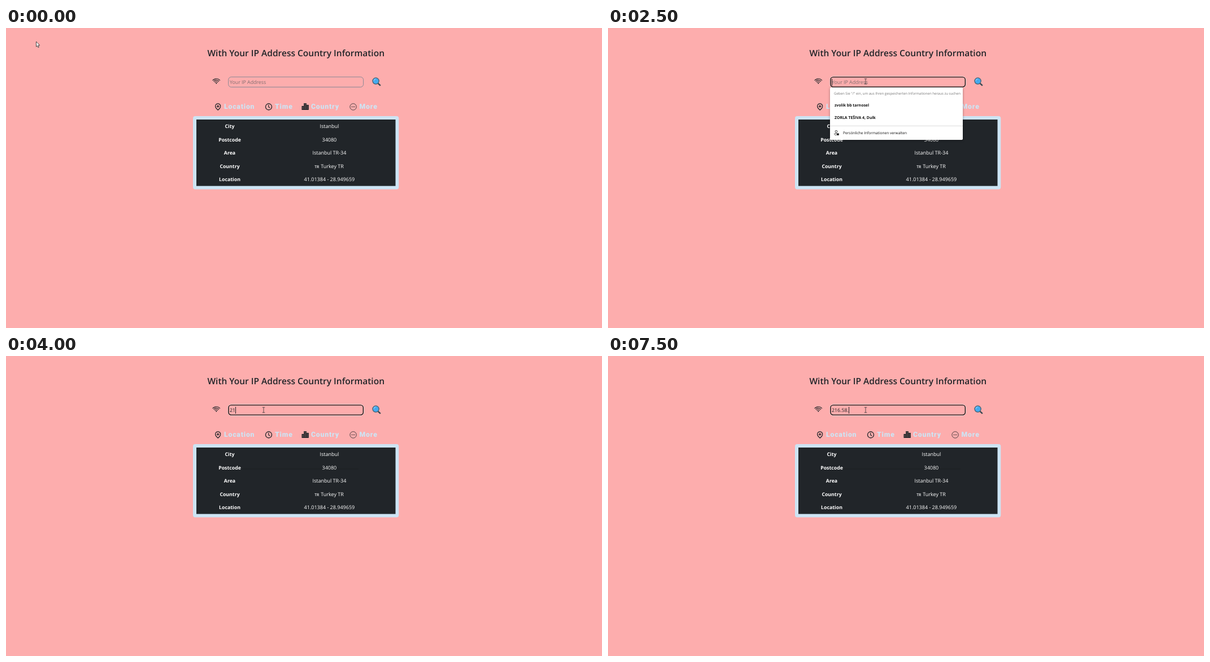
An HTML page with a canvas for the animation above (8000 ms loop, 1055 by 531 pixels).

```html
<!DOCTYPE html>
<html lang="en">
<head>
<meta charset="utf-8">
<title>IP address lookup</title>
<style>
  html, body { margin: 0; width: 100%; height: 100%; overflow: hidden; background: #fdadad; }
  canvas { display: block; }
</style>
</head>
<body>
<canvas id="stage" width="1055" height="531"></canvas>
<script>
const ctx = document.getElementById('stage').getContext('2d');
const LOOP = 8000, STEP = 500;
const PINK = '#fdadad', DARK = '#212529', PALE = '#cde4f4';
const SANS = '"Open Sans", "Noto Sans", sans-serif';

const ROWS = [
  ['City', 'Istanbul'],
  ['Postcode', '34080'],
  ['Area', 'Istanbul TR-34'],
  ['Country', 'Turkey TR'],
  ['Location', '41.01384 - 28.949659']
];

// Each entry holds from its step until the next one.
const POINTER = [
  [0, 'arrow', 53, 23.5], [1, 'arrow', 519, 122.5], [2, 'beam', 567, 199],
  [3, 'beam', 426, 98], [4, 'hand', 481, 133], [5, 'beam', 456, 94.5], [6, 'beam', 456, 95.5]
];
const TYPED = [[0, ''], [7, '2'], [8, '21'], [9, '216'], [11, '216.'], [13, '216.5'], [14, '216.58'], [15, '216.58.']];
const CARET_OFF = [6, 12];

const at = (track, step) => track.filter(entry => entry[0] <= step).pop();

function text(str, x, y, size, { weight = 400, color = DARK, align = 'left', family = SANS, spacing = 0 } = {}) {
  ctx.font = `${weight} ${size}px ${family}`;
  ctx.letterSpacing = spacing + 'px';
  ctx.textAlign = align;
  ctx.fillStyle = color;
  ctx.fillText(str, x, y);
}

function rect(x, y, w, h, color) {
  ctx.fillStyle = color;
  ctx.fillRect(x, y, w, h);
}

function roundRect(x, y, w, h, r) {
  ctx.beginPath();
  ctx.roundRect(x, y, w, h, r);
}

function stroke(color, width) {
  ctx.strokeStyle = color;
  ctx.lineWidth = width;
  ctx.stroke();
}

function fill(color) {
  ctx.fillStyle = color;
  ctx.fill();
}

function circle(x, y, r) {
  ctx.beginPath();
  ctx.arc(x, y, r, 0, Math.PI * 2);
}

function line(color, width, ...points) {
  ctx.beginPath();
  points.forEach(([x, y]) => ctx.lineTo(x, y));
  stroke(color, width);
}

function wifi() {
  ctx.lineCap = 'round';
  [3.4, 6, 8.6].forEach(r => {
    ctx.beginPath();
    ctx.arc(372.3, 98.4, r, -Math.PI * 0.76, -Math.PI * 0.24);
    stroke(DARK, 1.15);
  });
  ctx.lineCap = 'butt';
  circle(372.3, 97.8, 1.1);
  fill(DARK);
}

function magnifier() {
  ctx.lineCap = 'round';
  line('#37474f', 2.4, [659, 98.4], [662.2, 101.3]);
  ctx.lineCap = 'butt';
  circle(654.6, 93.8, 5.6);
  fill('#45a9ee');
  stroke('#4a5f6d', 1.3);
  ctx.beginPath();
  ctx.arc(654.6, 93.8, 3.6, Math.PI, Math.PI * 1.5);
  stroke('#9bd4f8', 1);
}

function pin() {
  ctx.beginPath();
  ctx.arc(375.2, 138.4, 4.5, Math.PI * 0.85, Math.PI * 0.15);
  ctx.quadraticCurveTo(378.4, 142.8, 375.2, 145.2);
  ctx.quadraticCurveTo(372, 142.8, 371.2, 140.4);
  ctx.closePath();
  stroke(DARK, 1.35);
  line(DARK, 1.3, [372.8, 138.6], [377.6, 138.6]);
  line(DARK, 1.3, [375.2, 136.2], [375.2, 141]);
}

function clock() {
  circle(465, 139.5, 5.5);
  stroke(DARK, 1.3);
  line(DARK, 1.2, [464.8, 136], [464.8, 139.8], [467.2, 141.4]);
}

function buildings() {
  rect(523.5, 138, 4, 7, DARK);
  rect(527, 133.3, 5, 11.7, DARK);
  rect(531.5, 136, 4.3, 9, DARK);
  for (let y = 135; y < 144; y += 2.4) {
    for (let x = 525; x < 535; x += 2.6) {
      if (y > 139 || (x > 527 && x < 531) || (x > 531 && y > 137)) rect(x, y, 0.9, 1, PINK);
    }
  }
}

function moreDots() {
  circle(614.6, 139.5, 5.7);
  stroke(DARK, 0.8);
  [-2.4, 0, 2.4].forEach(dx => {
    circle(614.6 + dx, 139.5, 0.75);
    fill(DARK);
  });
}

function nav() {
  pin();
  clock();
  buildings();
  moreDots();
  [['Location', 386], ['Time', 476], ['Country', 540], ['More', 625.5]].forEach(([word, x]) =>
    text(word, x, 142.8, 12.3, { weight: 900, color: PALE, family: 'Roboto, sans-serif', spacing: 0.8 }));
}

function table() {
  roundRect(331, 156, 364.3, 129.5, 4);
  fill(PALE);
  rect(337, 162, 352.5, 117.6, DARK);
  ROWS.forEach(([label, value], i) => {
    const y = 177.3 + i * 23.5;
    const isCountry = label === 'Country';
    text(label, 396, y, 8.75, { weight: 700, color: '#fff', align: 'center' });
    text(value, isCountry ? 577.6 : 572.4, y, 9, { color: '#fff', align: 'center' });
    if (isCountry) text('TR', 546.3, y, 6.6, { weight: 600, color: '#fff' });
  });
}

function input(focused, value, caretOn) {
  if (focused) {
    roundRect(392.9, 85.9, 240.5, 19.5, 5.8);
    stroke('rgba(255,255,255,.8)', 0.7);
    roundRect(393.9, 86.9, 238.5, 17.5, 4.8);
    stroke('#101010', 1.4);
  } else {
    roundRect(393.7, 86.7, 238.9, 17.9, 5);
    stroke('#7d8592', 0.9);
  }
  if (value) text(value, 396, 99.3, 8.8);
  else text('Your IP Address', 396, 99.3, 8.8, { color: '#806d70' });
  if (focused && caretOn) {
    ctx.font = `400 8.8px ${SANS}`;
    const x = 396 + ctx.measureText(value).width;
    rect(Math.round(x), 90, 1, 12, DARK);
  }
}

function personIcon() {
  circle(404, 183.2, 1.9);
  stroke('#333', 0.9);
  ctx.beginPath();
  ctx.moveTo(404, 189.5);
  ctx.bezierCurveTo(399.5, 189.5, 400.5, 186.6, 401.5, 186.6);
  ctx.lineTo(404.5, 186.6);
  stroke('#333', 0.9);
  rect(404.8, 186.4, 4, 3.5, '#222');
}

function popup(alpha, scale) {
  const cx = 510.6, cy = 151.7;
  const black = { color: '#111' };
  ctx.save();
  ctx.translate(cx, cy);
  ctx.scale(scale, scale);
  ctx.translate(-cx, -cy);
  ctx.globalAlpha = alpha;
  ctx.shadowColor = 'rgba(0,0,0,.35)';
  ctx.shadowBlur = 4;
  ctx.shadowOffsetY = 1;
  roundRect(393, 105.3, 235, 92.7, 2);
  fill('#fff');
  ctx.shadowColor = 'transparent';
  text('Geben Sie "/" ein, um aus Ihren gespeicherten Informationen heraus zu suchen',
    400, 117.9, 6.1, { color: '#757575' });
  text('zvolik bb tarnosel', 401, 139.2, 6.9, { weight: 700, ...black });
  text('ZORLA TEŠIVA 4, Dulk', 401, 161.4, 6.9, { weight: 700, ...black });
  rect(393, 172.8, 235, 0.9, '#d8d8d8');
  personIcon();
  text('Persönliche Informationen verwalten', 416, 188.4, 6.55, black);
  ctx.restore();
}

const pointers = {
  arrow() {
    ctx.beginPath();
    [[0.5, 0.5], [0.5, 9.6], [2.5, 7.8], [3.9, 11], [5.3, 10.4], [4, 7.3], [6.7, 7.1]]
      .forEach(([x, y]) => ctx.lineTo(x, y));
    ctx.closePath();
    fill('#fff');
    stroke('#222', 0.8);
  },
  beam(color) {
    line(color, 0.9, [0, -4.6], [0, 4.6]);
    [-4.6, 4.6].forEach(y => line(color, 0.9, [-2.3, y], [2.3, y]));
  },
  hand() {
    ctx.beginPath();
    ctx.moveTo(3, 8.5);
    ctx.lineTo(3, 1.8);
    ctx.quadraticCurveTo(3.9, 0, 4.9, 1.8);
    ctx.lineTo(4.9, 5.2);
    ctx.quadraticCurveTo(6.2, 4.5, 6.8, 5.7);
    ctx.quadraticCurveTo(8, 5.1, 8.4, 6.2);
    ctx.quadraticCurveTo(9.8, 5.9, 9.8, 7.3);
    ctx.lineTo(9.5, 10.5);
    ctx.lineTo(8.4, 13.6);
    ctx.lineTo(3.8, 13.6);
    ctx.lineTo(0.7, 9.2);
    ctx.quadraticCurveTo(0.8, 7.1, 3, 8.5);
    ctx.closePath();
    fill('#fff');
    stroke('#222', 0.9);
  }
};

function drawPointer([, shape, x, y]) {
  ctx.save();
  ctx.translate(x, y);
  pointers[shape](y > 160 ? '#ddd' : '#4b4144');
  ctx.restore();
}

function draw(time) {
  const step = Math.floor((time % LOOP) / STEP);
  ctx.textRendering = 'geometricPrecision';
  rect(0, 0, 1055, 531, PINK);
  text('With Your IP Address Country Information', 513.2, 49.8, 15.5, { weight: 600, align: 'center' });
  wifi();
  magnifier();
  nav();
  table();
  input(step >= 5, at(TYPED, step)[1], !CARET_OFF.includes(step));
  if (step === 5 || step === 6) popup(1, 1);
  if (step === 7) popup(0.32, 0.966);
  if (step >= 8) rect(416, 199.4, 208, 1, 'rgba(0,0,0,.2)');
  drawPointer(at(POINTER, step));
}

const start = performance.now();
function tick() {
  draw(performance.now() - start);
  requestAnimationFrame(tick);
}
tick();
</script>
</body>
</html>
```
